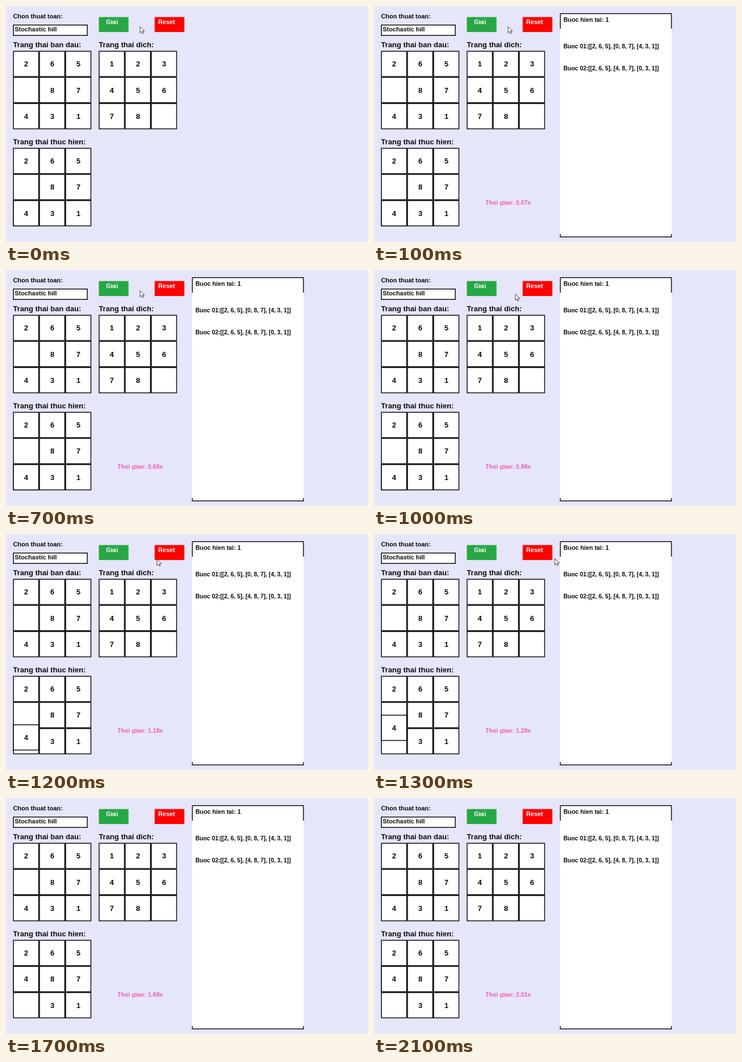
An HTML page for the animation above (2.3 s loop, 642 px wide and 418 px high).

```html
<!DOCTYPE html>
<html lang="vi">
<head>
<meta charset="utf-8">
<title>8-puzzle</title>
<style>
  html, body { margin: 0; width: 100%; height: 100%; overflow: hidden; background: #e6e6fa; }
  svg { display: block; width: 642px; height: 418px; }
  text { font: bold 11px "Liberation Sans", Arial, sans-serif; white-space: pre; fill: #0c0c0c; }
  .title, .digit { font-size: 13.1px; }
  .digit { text-anchor: middle; }
  .step { font-size: 10.6px; letter-spacing: -.1px; }
  .now { font-size: 10.8px; }
  .timer { font-size: 10.7px; fill: #ee5fb3; }
  .button { font-size: 10.9px; fill: #fff; }
  .cell { fill: #fff; stroke: #0c0c0c; stroke-width: 1.5; }
  .edge { fill: none; stroke: #0c0c0c; stroke-width: 1.5; }
</style>
</head>
<body>
<svg viewBox="0 0 642 418">
  <rect width="642" height="418" fill="#e6e6fa"/>
  <text x="12.5" y="22">Chon thuat toan:</text>
  <rect class="cell" x="13.2" y="33.7" width="131" height="18.4"/>
  <text x="15.5" y="45.3">Stochastic hill</text>
  <rect x="164.7" y="19.6" width="52.6" height="26.5" fill="#28a745"/>
  <text class="button" x="177.5" y="32">Gia<tspan dx=".7">i</tspan></text>
  <rect x="263.6" y="19.6" width="52.7" height="26.5" fill="#f00"/>
  <text class="button" x="270" y="32">Reset</text>
  <text class="title" x="12.6" y="73.3">Trang thai ban dau:</text>
  <text class="title" x="164.6" y="73.3">Trang thai dich:</text>
  <text class="title" x="12.6" y="245.3">Trang thai thuc hien:</text>
  <g id="boards"></g>
  <g id="result">
    <rect x="330" y="13" width="198" height="397" fill="#fff"/>
    <path class="edge" d="M330.5 40V13.5H527.5V40M330.5 404V409H527.5V404"/>
    <text class="now" x="336" y="28.4">Buoc hien tai: 1</text>
    <text class="step" x="336" y="74.6">Buoc 01:[[2, 6, 5], [0, 8, 7], [4, 3, 1]]</text>
    <text class="step" x="336" y="114.3">Buoc 02:[[2, 6, 5], [4, 8, 7], [0, 3, 1]]</text>
    <text class="timer" id="timer" x="197.5" y="352.4"></text>
  </g>
  <path id="cursor" d="M0 0V11.2L2.6 8.8 4.3 12.6 6 11.9 4.4 8.1H7.8Z"
        fill="#fff" stroke="#444" stroke-width="1" stroke-linejoin="round"/>
</svg>
<script>
  const LOOP = 2300, STEP = 100, LAST = 2100, CELL = 46.3, LINE = 1.5;
  const byId = id => document.getElementById(id);
  const clamp = (v, lo, hi) => Math.min(hi, Math.max(lo, v));

  function add(parent, tag, attrs, text = '') {
    const el = document.createElementNS('http://www.w3.org/2000/svg', tag);
    for (const key in attrs) el.setAttribute(key, attrs[key]);
    el.textContent = text;
    return parent.appendChild(el);
  }

  function addTile(parent, x, y, label) {
    const g = add(parent, 'g', {});
    const size = CELL - LINE;
    add(g, 'rect', { class: 'cell', x: x + LINE / 2, y: y + LINE / 2, width: size, height: size });
    add(g, 'text', { class: 'digit', x: x + CELL / 2 + .2, y: y + 27.8 }, label);
    return g;
  }

  function addBoard(x, y, digits) {
    [...digits].forEach((d, i) =>
      addTile(byId('boards'), x + i % 3 * CELL, y + Math.floor(i / 3) * CELL, d.trim()));
  }

  addBoard(12.4, 79.4, '265 87431');
  addBoard(164.4, 79.4, '12345678 ');
  addBoard(12.4, 251.3, '265 87 31');
  const tile = addTile(byId('boards'), 12.4, 251.3 + 2 * CELL, '4');

  // Pointer tip every 100 ms from 700 on; it has left the stage afterwards.
  const path = [[238, 37], [240, 34], [245, 39], [251, 43], [254, 44], [268, 45],
                [321, 44], [410, 36], [507, 29]];

  function draw(t) {
    byId('result').style.display = t < STEP ? 'none' : '';
    const seconds = Math.min(2.01, .07 + (t - STEP) * .001012);
    byId('timer').textContent = `Thoi gian: ${seconds.toFixed(2)}s`;

    const lift = clamp((t - 1160) * .17, 0, CELL);
    tile.setAttribute('transform', `translate(0 ${-lift})`);

    const tip = path[Math.max(0, t / STEP - 7)];
    const cursor = byId('cursor');
    cursor.style.display = tip ? '' : 'none';
    if (tip) cursor.setAttribute('transform', `translate(${tip[0] - .3} ${tip[1] - .6})`);
  }

  const start = performance.now();
  function tick() {
    const t = (performance.now() - start) % LOOP;
    draw(Math.min(LAST, Math.floor(t / STEP) * STEP));
    requestAnimationFrame(tick);
  }
  tick();
</script>
</body>
</html>
```
